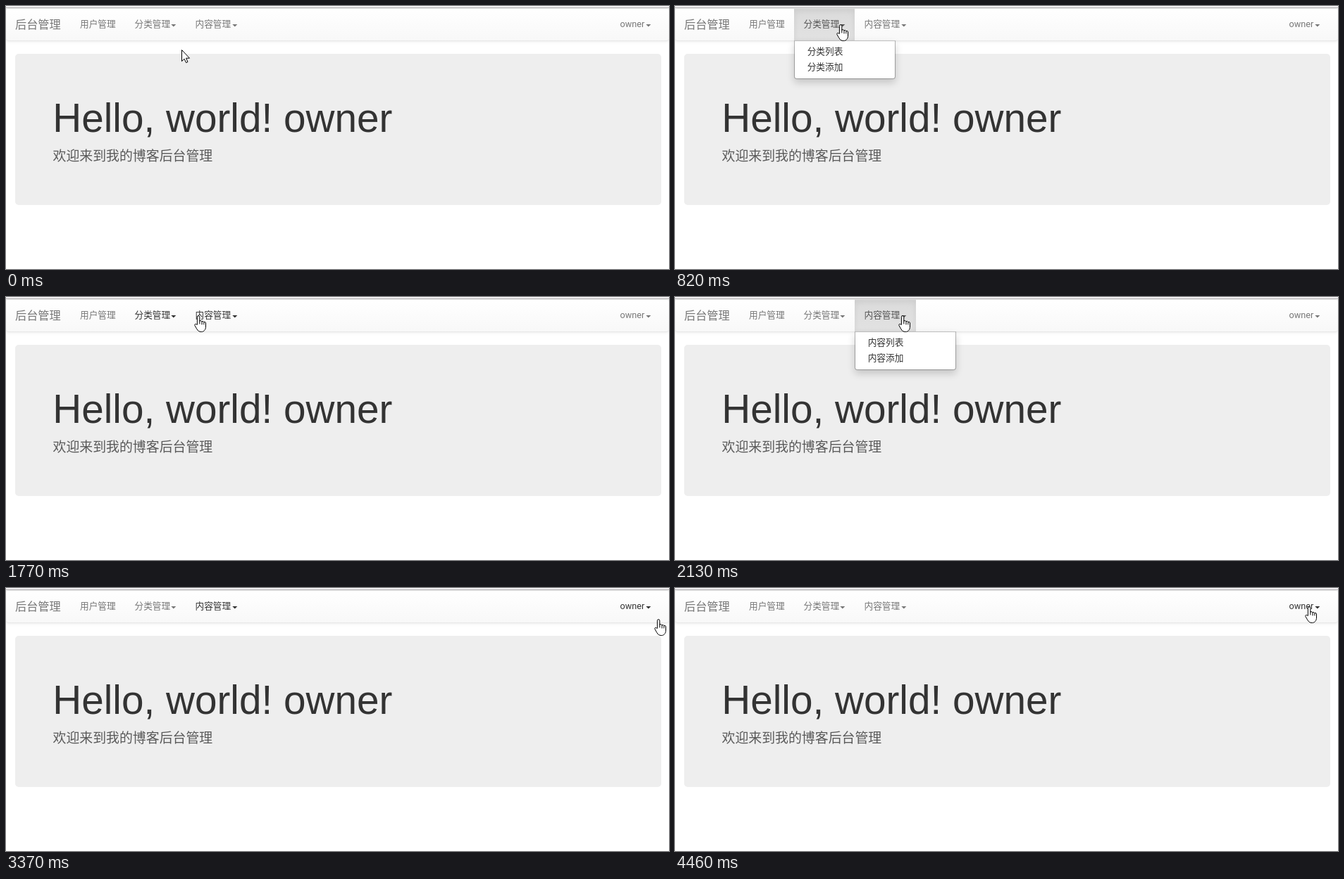
Recreate the animation shown at these times as an HTML page. Size 941 px wide and 374 px high, loop 5.15 s.

```html
<!DOCTYPE html>
<html lang="zh-CN">
<head>
<meta charset="utf-8">
<style>
html, body { margin: 0; width: 100%; height: 100%; overflow: hidden; background: #fff; }
div, svg { position: absolute; box-sizing: border-box; }
svg { left: 0; top: 0; }
#chrome { left: 0; top: 0; width: 941px; height: 3px; background: #f4f2f4; border-bottom: 1px solid #b2b0b2; }
#navbar {
  left: 0; top: 3px; width: 941px; height: 47px;
  background: linear-gradient(#fff, #f8f8f8);
  border: 1px solid #e7e7e7; border-width: 1px 0; border-radius: 4px;
  box-shadow: 0 1px 4.5px rgba(0,0,0,.075);
}
#jumbo { left: 13px; top: 68px; width: 917px; height: 215px; border-radius: 5px; background: #eee; }
.tab {
  top: 4px; height: 45px;
  background: linear-gradient(#dbdbdb, #e2e2e2);
  box-shadow: inset 0 3px 8px rgba(0,0,0,.075);
}
.menu {
  top: 49px; background: #fff; background-clip: padding-box;
  border: 1px solid rgba(0,0,0,.27); border-top-color: rgba(0,0,0,.15);
  border-radius: 0 0 4px 4px; box-shadow: 0 5px 11px rgba(0,0,0,.175);
}
text { font-family: Roboto, "Noto Sans CJK SC", "Noto Sans CJK", sans-serif; font-size: 12.7px; fill: #777; }
text.brand { font-size: 16.2px; }
text.item { fill: #333; }
text.title { font: 56.7px "Liberation Sans", Arial, sans-serif; fill: #333; }
text.lead { font-size: 18.9px; font-weight: 300; fill: #5a5a5a; }
</style>
</head>
<body>
<div id="chrome"></div>
<div id="navbar"></div>
<div id="jumbo"></div>
<div id="boxes"></div>
<svg width="941" height="374" viewBox="0 0 941 374">
  <text class="brand" x="13" y="32.3">后台管理</text>
  <text x="105" y="30">用户管理</text>
  <text class="title" x="66.3" y="179">Hello, world! owner</text>
  <text class="lead" x="66.5" y="219.5">欢迎来到我的博客后台管理</text>
  <g id="links"></g>
  <circle id="ring" r="11.5" fill="#f0e61e" opacity=".8"/>
  <path id="arrow" d="M.5.5V16.6L4.1 13.2 6.6 18.6 9 17.5 6.6 12.2H11.5Z" fill="#fff" stroke="#000"/>
  <g id="hand" fill="#fff" stroke="#000" stroke-linejoin="round" stroke-linecap="round">
    <path d="M-1.6 12V1.4a1.7 1.7 0 0 1 3.4 0V7q2.700-1 3.200.8 2.500-.8 2.900.8 2.600-.6 2.600 1.300V15c0 4.600-2.600 7.500-6.300 7.500s-5-1.700-6.500-4.200L-5 13.600c-.9-1.700.8-2.900 2-1.900Z"/>
    <path d="M1.800 7v4m3.200-3v4m2.900-3v3" fill="none"/>
  </g>
</svg>
<script>
const LOOP = 5150;
const CAPTURE = 75;     // the pointer is redrawn at this interval, in ms
const MENU_WIDTH = 144;
const ROW = 22;

// presses: pointer button down and up, first to open the menu, then to close it
const links = [
  { label: "分类管理", left: 169, right: 255, items: ["分类列表", "分类添加"], presses: [[660, 820], [1440, 1520]] },
  { label: "内容管理", left: 255, right: 342, items: ["内容列表", "内容添加"], presses: [[1980, 2130], [2760, 2910]] },
  { label: "owner", left: 858, right: 929, items: ["退出后台管理"], alignRight: true, presses: [[3610, 3690], [4380, 4460]] }
];

const glides = [
  { start: 0, end: 580, from: [249, 62], to: [235, 27] },
  { start: 1620, end: 1950, from: [235, 27], to: [323, 27] },
  { start: 2910, end: 3220, from: [323, 27], to: [922, 54] },
  { start: 3370, end: 3610, from: [926, 45], to: [900, 27] }
];

const $ = id => document.getElementById(id);
const show = (node, on) => { node.style.display = on ? "" : "none"; };
const moveTo = (node, x, y) => node.setAttribute("transform", `translate(${x} ${y})`);
const smooth = p => p * p * (3 - 2 * p);

function addSvg(parent, tag, attrs, content = "") {
  const node = document.createElementNS("http://www.w3.org/2000/svg", tag);
  for (const key in attrs) node.setAttribute(key, attrs[key]);
  node.textContent = content;
  return parent.appendChild(node);
}

function addBox(className, left, width, height) {
  const box = document.createElement("div");
  box.className = className;
  box.style.left = left + "px";
  box.style.width = width + "px";
  if (height) box.style.height = height + "px";
  return $("boxes").appendChild(box);
}

for (const link of links) {
  const menuLeft = link.alignRight ? link.right - MENU_WIDTH : link.left;
  const tab = addBox("tab", link.left, link.right - link.left);
  const menu = addBox("menu", menuLeft, MENU_WIDTH, 11 + ROW * link.items.length);
  const items = addSvg($("links"), "g", {});
  link.items.forEach((item, i) =>
    addSvg(items, "text", { x: menuLeft + 18.7, y: 69 + ROW * i, class: "item" }, item));
  link.popup = [tab, menu, items];
  link.parts = [
    addSvg($("links"), "text", { x: link.left + 13.5, y: 30 }, link.label),
    addSvg($("links"), "path", { d: `M${link.right - 20.7} 26h7l-3.5 3.6z` })
  ];
}

function pointerAt(time) {
  const { start, end, from, to } = glides.filter(g => g.start <= time).pop();
  const elapsed = Math.floor((time - start) / CAPTURE) * CAPTURE;
  const progress = time >= end ? 1 : smooth(elapsed / (end - start));
  return from.map((value, i) => value + (to[i] - value) * progress);
}

function render(time) {
  const [x, y] = pointerAt(time);
  const hover = links.find(l => x >= l.left && x < l.right && y >= 4 && y < 50);
  const focus = links.filter(l => time >= l.presses[0][0]).pop();
  let pressed = false;

  for (const link of links) {
    const [first, second] = link.presses;
    const open = time >= first[1] && time < second[1];
    const color = open ? "#555" : link === hover || link === focus ? "#333" : "#777";
    link.parts.forEach(part => { part.style.fill = color; });
    link.popup.forEach(part => show(part, open));
    pressed ||= link.presses.some(([down, up]) => time >= down && time < up);
  }
  show($("ring"), pressed);
  show($("hand"), hover);
  show($("arrow"), !hover);
  moveTo($("ring"), x - .5, y - .5);
  moveTo($("hand"), x, y);
  moveTo($("arrow"), x, y);
}

const begin = performance.now();
function tick() {
  render((performance.now() - begin) % LOOP);
  requestAnimationFrame(tick);
}
tick();
</script>
</body>
</html>
```
